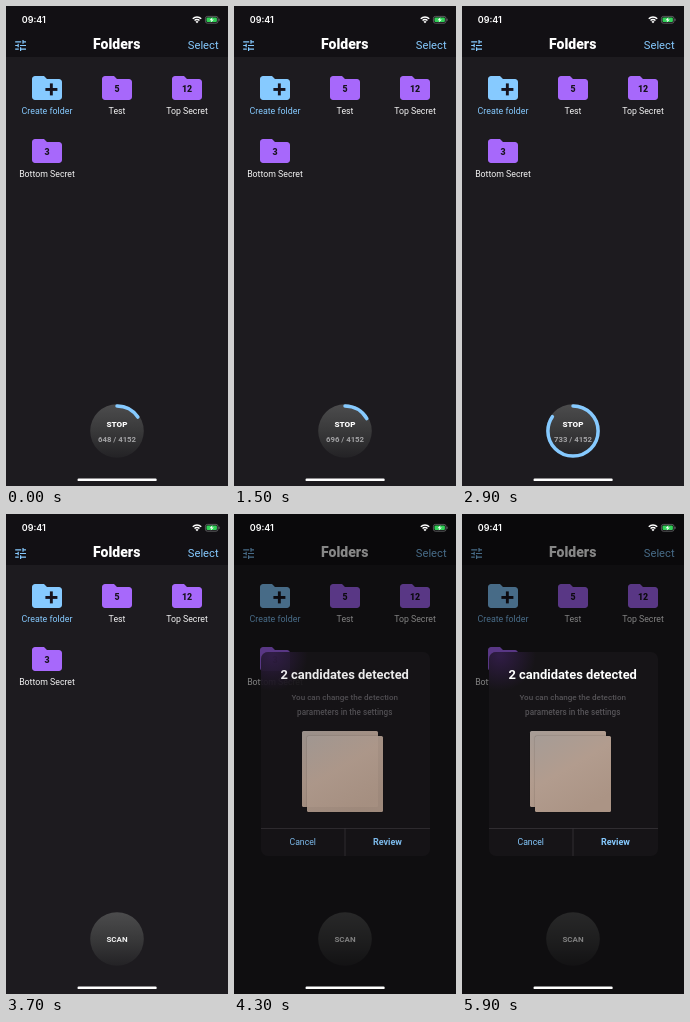
These frames come from a looping animation (222x480 px, 6 s). An HTML page with a canvas:

```html
<!DOCTYPE html>
<html lang="en">
<head>
<meta charset="utf-8">
<title>Folder scan</title>
<style>
html, body { margin: 0; width: 100%; height: 100%; overflow: hidden; background: #1c1b1e; }
canvas { display: block; width: 222px; height: 480px; }
</style>
</head>
<body>
<canvas id="stage"></canvas>
<script>
const W = 222, H = 480, LOOP = 6000, STEP = 100;
const BLUE = '#86caff', PURPLE = '#a768fb', INK = '#17131d';
const TOTAL = 4152, FIRST = 648, LAST = 733, RATE = 31.8;
const canvas = document.getElementById('stage');
const ctx = canvas.getContext('2d');
const ratio = window.devicePixelRatio || 1;
canvas.width = W * ratio;
canvas.height = H * ratio;

const folderPath = new Path2D('M10 4H4c-1.1 0-2 .9-2 2v12c0 1.1.9 2 2 2h16c1.1 0 2-.9 2-2V8c0-1.1-.9-2-2-2h-8z');
const tunePath = new Path2D('M3 17v2h6v-2zM3 5v2h10V5zM13 21v-2h8v-2h-8v-2h-2v6zM7 9v2H3v2h4v2h2V9zM21 13v-2H11v2zM15 9h2V7h4V5h-4V3h-2z');
const boltPath = new Path2D('M206.5 11.2l-3 3h2l-.8 2.4 3.2-3.2h-2z');

const clamp = v => Math.min(1, Math.max(0, v));
const ramp = (t, from, to) => clamp((t - from) / (to - from));
const easeOut = v => 1 - (1 - v) * (1 - v);

function text(str, x, y, size, color, weight = 400, family = 'Roboto') {
  ctx.font = `${weight} ${size}px ${family}, sans-serif`;
  ctx.textAlign = 'center';
  ctx.textBaseline = 'alphabetic';
  ctx.fillStyle = color;
  ctx.fillText(str, x, y);
}

function rect(x, y, w, h, color, radius = 0) {
  ctx.fillStyle = color;
  ctx.beginPath();
  ctx.roundRect(x, y, w, h, radius);
  ctx.fill();
}

function icon(path, x, y, scale, color) {
  ctx.save();
  ctx.translate(x, y);
  ctx.scale(scale, scale);
  ctx.fillStyle = color;
  ctx.fill(path);
  ctx.restore();
}

function gradient(x0, y0, x1, y1, ...colors) {
  const g = ctx.createLinearGradient(x0, y0, x1, y1);
  colors.forEach((c, i) => g.addColorStop(i / (colors.length - 1), c));
  return g;
}

function folder(x, y, label, count) {
  icon(folderPath, x - 18, y - 18, 1.5, PURPLE);
  text(count, x, y + 4.2, 8.8, INK, 800);
  text(label, x, y + 26, 8.75, '#f4f4f4');
}

function createFolder(x, y) {
  icon(folderPath, x - 18, y - 18, 1.5, BLUE);
  rect(x - 1.6, y, 12, 2.9, INK);
  rect(x + 2.9, y - 4.6, 2.9, 12, INK);
  text('Create folder', x, y + 26, 8.85, BLUE);
}

function statusBar() {
  text('09:41', 27.8, 17, 9, '#fff', 600, 'Inter');
  ctx.strokeStyle = '#fff';
  ctx.lineWidth = 1.4;
  for (const r of [3.5, 6]) {
    ctx.beginPath();
    ctx.arc(191, 17, r, -Math.PI * 0.75, -Math.PI * 0.25);
    ctx.stroke();
  }
  ctx.fillStyle = '#fff';
  ctx.beginPath();
  ctx.moveTo(191, 17.3);
  ctx.arc(191, 17.3, 2.2, -Math.PI * 0.75, -Math.PI * 0.25);
  ctx.fill();
  ctx.strokeStyle = '#77797a';
  ctx.lineWidth = 0.7;
  ctx.beginPath();
  ctx.roundRect(199.4, 10.4, 12.6, 6.8, 2);
  ctx.stroke();
  rect(200.5, 11.5, 10.4, 4.6, '#32d158', 1.1);
  rect(212.6, 12.6, 0.9, 2.3, '#77797a', 0.4);
  ctx.fillStyle = '#fff';
  ctx.fill(boltPath);
}

function scanButton(t) {
  const x = 111, y = 425, scanning = t < 3300;
  ctx.fillStyle = gradient(x, y - 27, x, y + 27, '#4c4c4d', '#39393a', '#232225');
  ctx.beginPath();
  ctx.arc(x, y, 26.8, 0, Math.PI * 2);
  ctx.fill();
  if (!scanning) {
    text('SCAN', x, y + 2.9, 8, '#f0f0f0', 700);
    return;
  }
  const count = Math.min(LAST, Math.round(FIRST + t * RATE / 1000));
  const base = count / TOTAL;
  const progress = base + (1 - base) * easeOut(ramp(t, 2650, 3090));
  ctx.strokeStyle = BLUE;
  ctx.lineWidth = 3.5;
  ctx.lineCap = 'round';
  ctx.beginPath();
  ctx.arc(x, y, 25.1, -Math.PI / 2, Math.PI * (2 * progress - 0.5));
  ctx.stroke();
  ctx.lineCap = 'butt';
  text('STOP', x, 421, 8.1, '#fff', 800);
  text(`${count} / ${TOTAL}`, x, 436, 7.8, '#a3a3a5', 700);
}

function photo(x, y) {
  ctx.save();
  ctx.shadowColor = 'rgba(0,0,0,.4)';
  ctx.shadowBlur = 1.5 * ratio;
  rect(x, y, 76, 76, gradient(x, y, x + 45, y + 76, '#a69c96', '#b29c8e', '#ab9485'), 1.5);
  ctx.restore();
}

function dialog(amount) {
  if (!amount) return;
  const x = 27, y = 138, w = 169, h = 204;
  ctx.save();
  ctx.globalAlpha = amount;
  ctx.beginPath();
  ctx.roundRect(x, y, w, h, 7);
  ctx.clip();
  rect(x, y, w, h, '#161417');
  const glow = ctx.createRadialGradient(38, 141, 2, 38, 141, 36);
  glow.addColorStop(0, 'rgba(72,36,112,.5)');
  glow.addColorStop(1, 'rgba(72,36,112,0)');
  rect(x, y, 60, 50, glow);
  text('2 candidates detected', 110.7, 165, 12.9, '#fff', 700);
  text('You can change the detection', 110.7, 186.3, 8.05, '#555357', 500);
  text('parameters in the settings', 110.7, 200.6, 8.15, '#555357', 500);
  photo(68, 217);
  photo(73, 222);
  rect(x, 314, w, 0.8, '#38363a');
  rect(110.6, 314, 0.8, 28, '#38363a');
  text('Cancel', 68.7, 331.3, 8.7, BLUE);
  text('Review', 153.5, 331.3, 9, BLUE, 700);
  ctx.restore();
}

function draw(t) {
  ctx.setTransform(ratio, 0, 0, ratio, 0, 0);
  rect(0, 0, W, H, '#1d1b1f');
  rect(0, 0, W, 51, '#121014');
  icon(tunePath, 7.4, 32.3, 0.6, BLUE);
  text('Folders', 110.7, 43, 14, '#fff', 800);
  text('Select', 197.2, 43, 11.2, BLUE);
  createFolder(41, 82);
  folder(111, 82, 'Test', '5');
  folder(181, 82, 'Top Secret', '12');
  folder(41, 145, 'Bottom Secret', '3');
  scanButton(t);
  rect(0, 0, W, H, `rgba(0,0,0,${0.47 * ramp(t, 3720, 4070)})`);
  dialog(easeOut(ramp(t, 4050, 4400)));
  statusBar();
  rect(71.5, 472.6, 79.2, 2.5, '#fff', 1.2);
}

const start = performance.now();
function tick() {
  const t = (performance.now() - start) % LOOP;
  draw(Math.floor(t / STEP) * STEP);
  requestAnimationFrame(tick);
}
tick();
</script>
</body>
</html>
```
